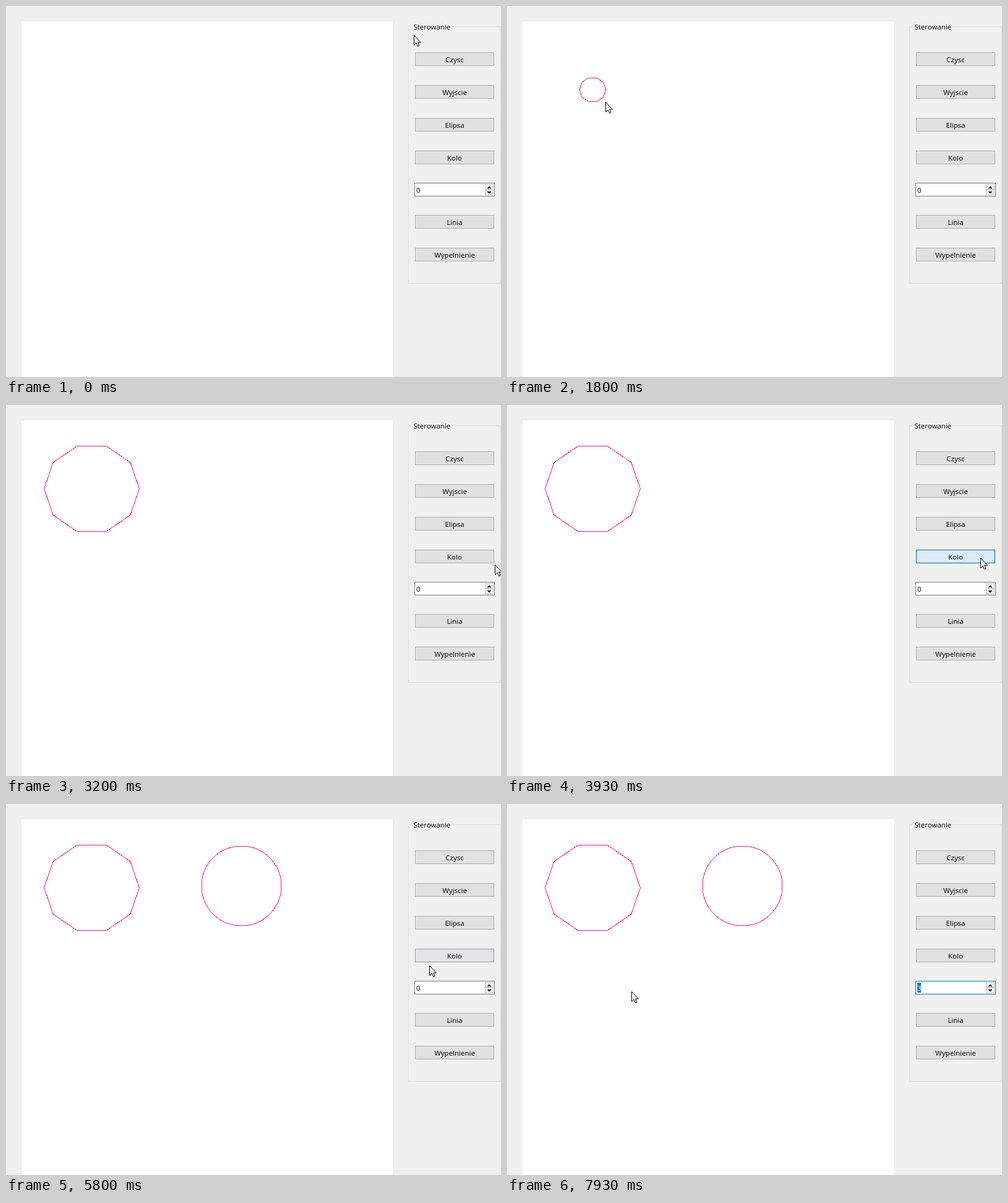
An HTML page that plays this animation: 800x600 px, repeating every 8 s.

```html
<!DOCTYPE html>
<html lang="pl">
<head>
<meta charset="utf-8">
<title>Sterowanie</title>
<style>
  html, body { margin: 0; width: 100%; height: 100%; overflow: hidden; background: #f0f0f0; }
  svg { display: block; width: 800px; height: 600px; }
  text { font: 11.5px "Open Sans", "Noto Sans", sans-serif; }
  .mid { text-anchor: middle; }
  .shape { fill: none; stroke: #ff1493; }
  .arrow { fill: #f0f0f0; stroke: #c8c8c8; }
</style>
</head>
<body>
<svg viewBox="0 0 800 600">
  <g shape-rendering="crispEdges">
    <rect x="25" y="25" width="600" height="575" fill="#fff"/>
    <path d="M657 33.5H650.5V448.5H799.5V33.5H719" fill="none" stroke="#dcdcdc"/>
    <polygon class="shape" id="ellipse"/>
    <circle class="shape" id="circle" cx="380.5" cy="132.5"/>
    <rect id="spin" x="660.5" y="286.5" width="129" height="21" fill="#fff"/>
    <rect id="selection" x="663" y="289" width="6" height="16" fill="#0078d7"/>
    <rect class="arrow" id="up" x="774.5" y="288.5" width="13" height="8"/>
    <rect class="arrow" x="774.5" y="297.5" width="13" height="8"/>
    <path d="M778 295h6l-3-4zM778 300h6l-3 4z"/>
  </g>
  <text x="658.5" y="38">Sterowanie</text>
  <text id="value" x="663" y="302"></text>
  <g id="buttons"></g>
  <path id="cursor" d="M.5.5V16.6L4.2 13 6.7 18.4 9 17.4 6.6 12.1H11.4Z" fill="#fff" stroke="#000"/>
</svg>
<script>
const TICK = 200 / 3, LOOP = 8000;
const $ = id => document.getElementById(id);

// Keys: [tick, value, ...], linear in between
const cursorKeys = [
  [0, 659, 47], [8, 686, 190], [11, 676, 196], [13, 632, 201], [18, 131, 132],
  [19, 138, 135], [23, 138, 135], [34, 197, 191], [36, 197, 191], [37, 208, 197],
  [38, 215, 207], [41, 240, 213], [43, 456, 236], [44, 830, 258], [48, 790, 258],
  [49, 786, 258], [51, 786, 258], [59, 765, 247], [61, 764, 246], [64, 425, 142],
  [66, 380, 132], [69, 380, 132], [72, 400, 149], [77, 428, 164], [80, 435, 167],
  [83, 470, 180], [87, 684, 261], [93, 785, 292], [108, 785, 292], [111, 740, 282],
  [119, 201, 303]
];
const ellipseKeys = [[23, 0, 0], [34, 59, 55.7], [36, 59, 55.7], [37, 66, 63], [38, 77, 72.5]];
const circleKeys = [[69, 0], [72, 21.5], [77, 57.5], [79, 57.5], [80, 64.5]];

// Button levels: 0 normal, 1 hover, 2 pressed
const passing = tick => [[tick, 0], [tick + 2, .6], [tick + 7, 0]];
const idle = [[0, 0]];
const elipsaKeys = [[6, 0], [9, 2], [11, 2], [13, 1.3], [17, 0]];
const koloKeys = [[53, 0], [55, 1], [58, 1], [60, 2], [62, 1.3], [64, 0], [85, 0], [86, .3], [89, 0]];
const buttons = [
  ["Czysc", 75, passing(2)],
  ["Wyjscie", 128, passing(4)],
  ["Elipsa", 181, elipsaKeys],
  ["Kolo", 234, koloKeys],
  ["Linia", 338, idle],
  ["Wypelnienie", 391, idle]
];
const fills = ["#e1e1e1", "#e5f1fb", "#cce4f7"];
const borders = ["#adadad", "#0078d7", "#005499"];

function at(keys, n) {
  const i = keys.findIndex(key => key[0] > n);
  if (i < 0) return keys.at(-1).slice(1);
  if (i === 0) return keys[0].slice(1);
  const a = keys[i - 1], b = keys[i], k = (n - a[0]) / (b[0] - a[0]);
  return a.map((v, j) => v + (b[j] - v) * k).slice(1);
}

function upLevel(n) {
  if (n < 93 || n >= 112) return 0;
  if (n < 96) return 1;
  if (n < 109) return 1.5 - Math.cos((n - 95) * Math.PI / 2.25) / 2;
  return (112 - n) / 3;
}

function set(el, attrs) {
  for (const name in attrs) el.setAttribute(name, attrs[name]);
}

function paint(el, level) {
  const i = Math.min(1, Math.floor(level));
  const color = list => `color-mix(in srgb, ${list[i]}, ${list[i + 1]} ${(level - i) * 100}%)`;
  el.style.fill = color(fills);
  el.style.stroke = color(borders);
}

$("buttons").innerHTML = buttons.map(([label, y]) =>
  `<rect x="661.5" y="${y + .5}" width="127" height="21" shape-rendering="crispEdges"/>
   <text class="mid" x="725" y="${y + 16}">${label}</text>`).join("");
const faces = document.querySelectorAll("#buttons rect");

function decagon(rx, ry) {
  return Array.from({ length: 10 }, (_, i) => {
    const a = i * Math.PI / 5;
    return [138.5 + rx * Math.cos(a), 135.5 + ry * Math.sin(a)].map(v => v.toFixed(1));
  }).join(" ");
}

function draw(n) {
  const [x, y] = at(cursorKeys, n).map(Math.round);
  set($("cursor"), { transform: `translate(${x} ${y})` });

  const [rx, ry] = at(ellipseKeys, n), [r] = at(circleKeys, n);
  set($("ellipse"), { points: rx ? decagon(rx, ry) : "" });
  set($("circle"), { r, visibility: r ? "visible" : "hidden" });

  buttons.forEach((button, i) => paint(faces[i], at(button[2], n)[0]));
  const level = upLevel(n);
  if (level) paint($("up"), level);
  else $("up").removeAttribute("style");

  const focused = n >= 96;
  const hovered = n >= 91 && n < 111;
  set($("spin"), { stroke: hovered ? "#171717" : focused ? "#0078d7" : "#7a7a7a" });
  set($("selection"), { visibility: focused ? "visible" : "hidden" });
  set($("value"), { fill: focused ? "#fff" : "#000" });
  $("value").textContent = [96, 101, 105].filter(tick => n >= tick).length;
}

const start = performance.now();
function frame() {
  const t = (performance.now() - start) % LOOP;
  draw(Math.floor((t + 4) / TICK) % 120);
  requestAnimationFrame(frame);
}
frame();
</script>
</body>
</html>
```
